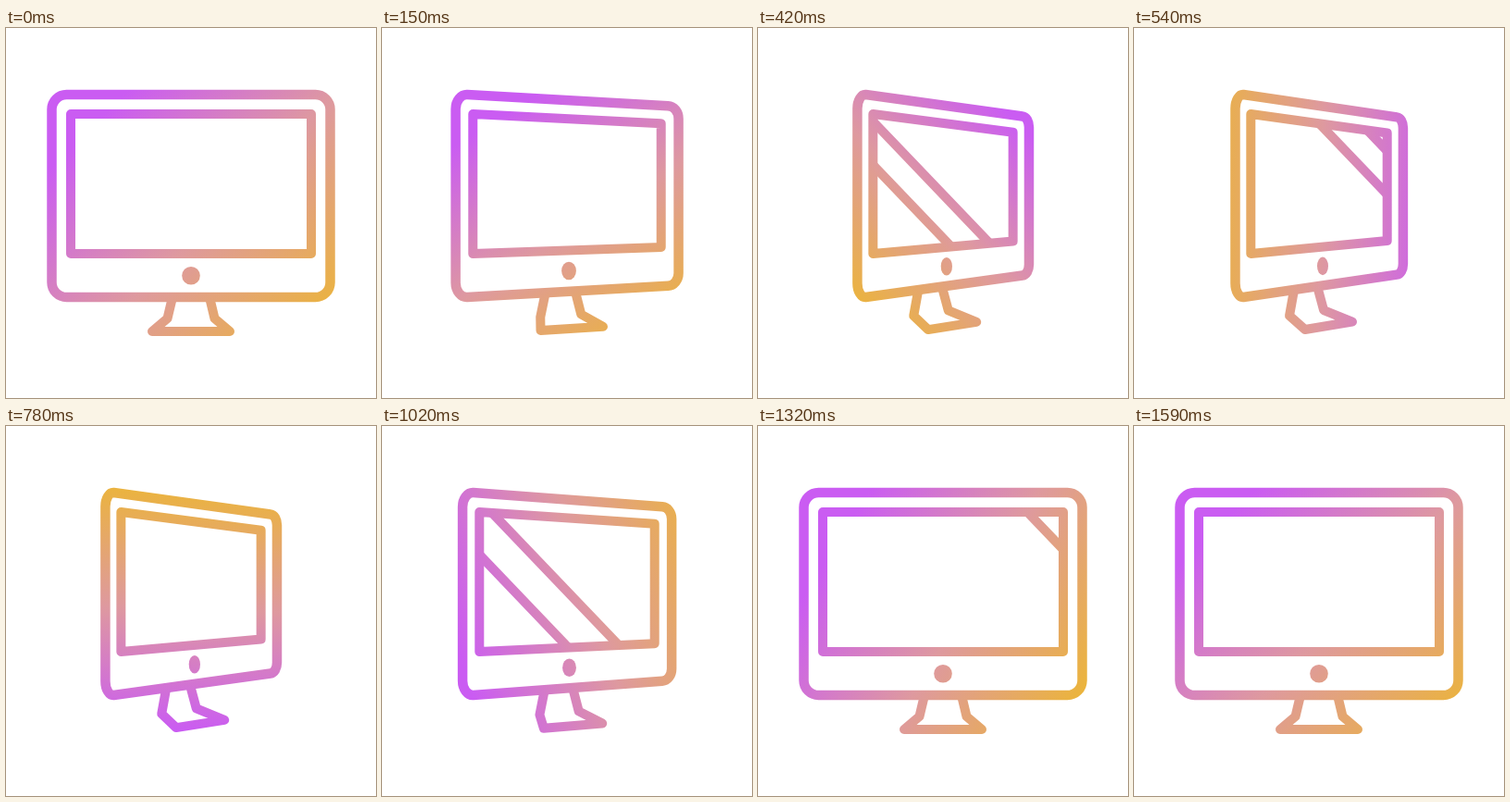
An HTML page for the animation above (2620 ms loop, 400 by 400 pixels).

```html
<!DOCTYPE html>
<html lang="en">
<head>
<meta charset="utf-8">
<title>Monitor</title>
<style>
  html, body { margin: 0; width: 100%; height: 100%; overflow: hidden; background: #fff; }
  svg { display: block; width: 100%; height: 100%; }
</style>
</head>
<body>
<svg viewBox="0 0 400 400">
  <defs>
    <linearGradient id="tint" gradientUnits="userSpaceOnUse">
      <stop offset="0" stop-color="#ca5cf2"/>
      <stop offset=".5" stop-color="#de999f"/>
      <stop offset="1" stop-color="#ebb43c"/>
    </linearGradient>
    <clipPath id="glass"><path id="glassShape"/></clipPath>
  </defs>
  <g fill="none" stroke="url(#tint)" stroke-width="10" stroke-linejoin="round">
    <g clip-path="url(#glass)"><path id="glare"/></g>
    <path id="stand"/>
    <path id="screen"/>
    <path id="body" stroke-width="10.5"/>
  </g>
  <ellipse id="dot" fill="url(#tint)"/>
</svg>
<script>
const LOOP = 2620, STEP = 30, LAST = 1590, TURN = 600;
const $ = id => document.getElementById(id);
const lerp = (a, b, k) => a + (b - a) * k;

// Each shape facing front, then fully turned.
const poses = {
  body: [
    'M65.5 72 L334.5 72 C343.3 72 350.5 79.2 350.5 88 L350.5 275 C350.5 284 343.3 291 334.5 291 L65.5 291 C56.7 291 49.5 284 49.5 275 L49.5 88 C49.5 79.2 56.7 72 65.5 72Z',
    'M118.5 72 L284 96.5 C288 97 290.7 102 290.7 108 L290.7 255 C290.7 261 288 266 284 266.5 L118.5 291 C114 291.5 109.7 285 109.7 276 L109.7 87 C109.7 78 114 71.5 118.5 72Z'
  ],
  screen: [
    'M70 93 L330 93 L330 244 L70 244Z',
    'M126.5 93 L273.5 113.5 L273.5 230 L126.5 244Z'
  ],
  stand: [
    'M180 291 L174.5 314 L158 328 L242 328 L225.5 314 L220 291',
    'M173 283 L168 311 L185 326 L236 317.5 L205 305 L198.5 281'
  ]
};

// Gradient: time, centre x, centre y, half length.
const spans = [
  [0, 215, 215, 163], [270, 200, 222, 132], [540, 202, 200, 132], [780, 200, 198, 132],
  [1020, 226, 192, 152], [1170, 222, 200, 152], [LAST, 215, 215, 163]
];

// Glare passes: start, end, x of the leading line at start, speed, gap.
const passes = [
  [285, 640, -15, .99, 45],
  [780, 1400, -64, .767, 57]
];

// Cubic bezier easing with flat ends.
function ease(x, x1, x2) {
  let lo = 0, hi = 1;
  for (let i = 0; i < 30; i++) {
    const s = (lo + hi) / 2, r = 1 - s;
    if (3 * s * r * r * x1 + 3 * s * s * r * x2 + s * s * s < x) lo = s;
    else hi = s;
  }
  return lo * lo * (3 - 2 * lo);
}

function morph([from, to], k) {
  const goal = to.match(/[\d.]+/g);
  let i = 0;
  return from.replace(/[\d.]+/g, n => lerp(+n, +goal[i++], k).toFixed(2));
}

function set(id, attrs) {
  for (const name in attrs) $(id).setAttribute(name, attrs[name]);
}

function paintTint(t) {
  const i = Math.max(1, spans.findIndex(s => s[0] >= t));
  const a = spans[i - 1], b = spans[i], k = (t - a[0]) / (b[0] - a[0]);
  const [cx, cy, half] = [1, 2, 3].map(n => lerp(a[n], b[n], k));
  const angle = Math.PI * (.25 + 2 * ease(t / LAST, .288, .47));
  const dx = half * Math.cos(angle), dy = half * Math.sin(angle);
  set('tint', { x1: cx - dx, y1: cy - dy, x2: cx + dx, y2: cy + dy });
}

function glarePath(t) {
  const pass = passes.find(p => t >= p[0] && t < p[1]);
  if (!pass) return '';
  const [start, , x0, speed, gap] = pass;
  const x = x0 + (t - start) * speed;
  const line = left => `M${left - 33.5} 60 l220 230`;
  return line(x) + line(x - gap);
}

function draw(t) {
  const turn = t < 2 * TURN ? ease(1 - Math.abs(t - TURN) / TURN, .333, 0) : 0;
  for (const id in poses) set(id, { d: morph(poses[id], turn) });
  set('glassShape', { d: morph(poses.screen, turn) });
  set('glare', { d: glarePath(t) });
  set('dot', {
    cx: lerp(200, 204, turn), cy: lerp(267.8, 257.3, turn),
    rx: lerp(9.8, 6, turn), ry: 9.8
  });
  paintTint(t);
}

const begin = performance.now();
function tick() {
  const t = (performance.now() - begin) % LOOP;
  draw(Math.min(LAST, Math.floor(t / STEP) * STEP));
  requestAnimationFrame(tick);
}
tick();
</script>
</body>
</html>
```
